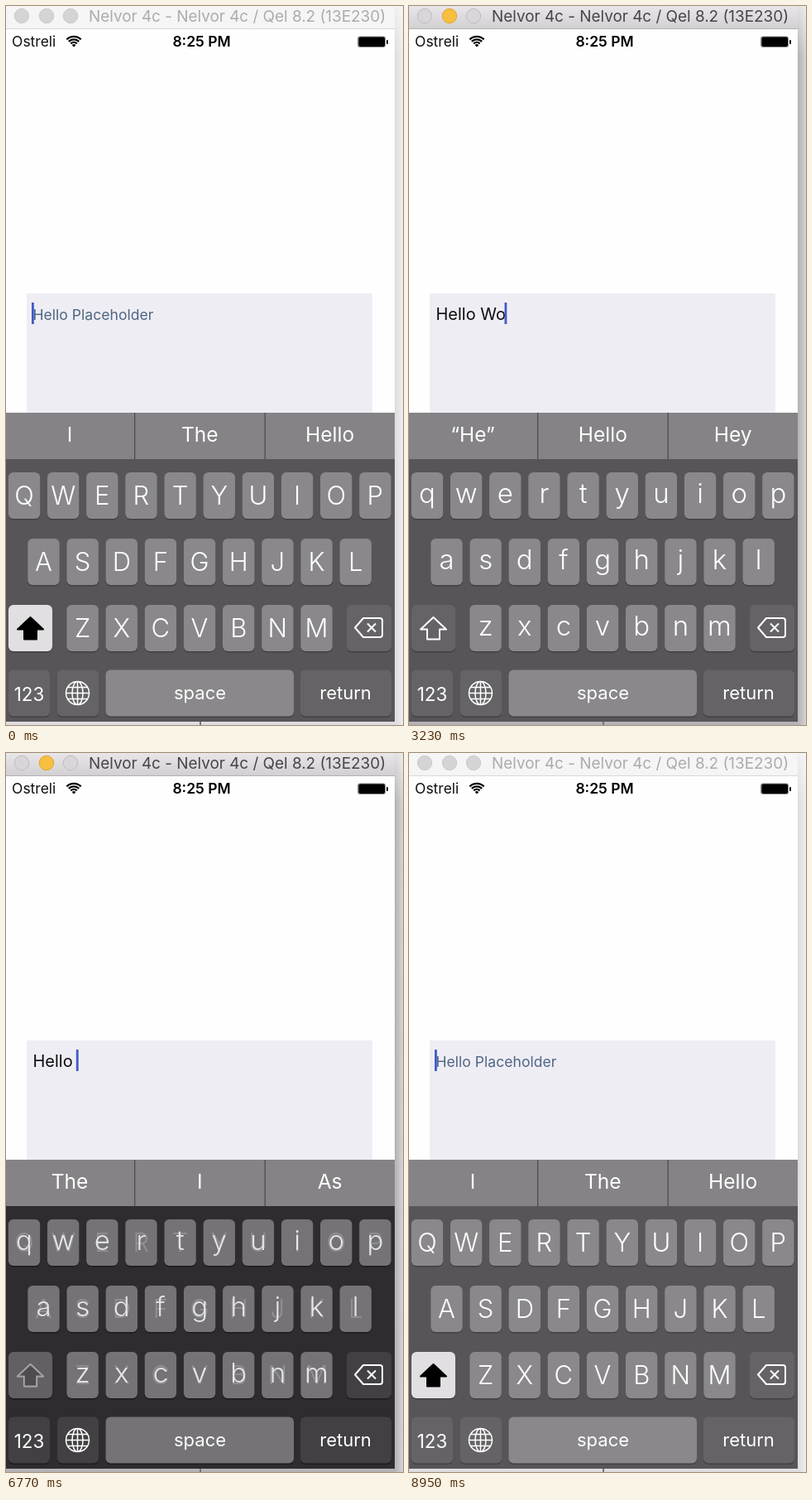
An HTML page with a canvas for the animation above (8990 ms loop, 480 px wide and 868 px high).

```html
<!DOCTYPE html>
<html lang="en">
<head>
<meta charset="utf-8">
<title>Text view placeholder</title>
<style>
  html, body { margin: 0; width: 100%; height: 100%; overflow: hidden; background: #fff; }
  canvas { display: block; }
</style>
</head>
<body>
<canvas id="stage" width="480" height="868"></canvas>
<script>
const ctx = document.getElementById('stage').getContext('2d');
const LOOP = 8990;
const FAMILY = 'Inter, Roboto, sans-serif';
const FULL = 'Hello World!!!';

// Timelines: [start in ms, value]
const typed = [
  [0, ''], [1340, 'J'], [1960, ''], [2400, 'H'], [2600, 'He'], [2720, 'Hel'],
  [2820, 'Hell'], [2920, 'Hello'], [3030, 'Hello '], [3130, 'Hello W'],
  [3210, 'Hello Wo'], [3330, 'Hello Wor'], [3450, 'Hello Worl'], [3560, 'Hello World'],
  [4250, 'Hello World!'], [4480, 'Hello World!!'], [4700, FULL]
];
for (let n = 1; n <= 8; n++) typed.push([5860 + 90 * n, FULL.slice(0, -n)]);
typed.push([6850, '']);

const hints = [
  [0, ['I', 'The', 'Hello']],
  [2870, ['“He”', 'Hello', 'Hey']],
  [3780, ['“World”', 'World', 'World’s']],
  [4340, ['The', 'I', 'As']],
  [4780, ['I', 'The', 'As']],
  [6150, ['The', 'I', 'As']],
  [8100, ['I', 'The', 'Hello']]
];
const shifts = [[-1000, 1], [1340, 0], [1960, 1], [2400, 0], [6710, 1]];
const blinks = [500, 5230, 7050, 8050];
const ACTIVE_FROM = 400, ACTIVE_TO = 8750, FADE = 300;

const at = (list, t) => list.filter(e => e[0] <= t).pop();
const clamp = v => Math.max(0, Math.min(1, v));
const mix = (a, b, p) => a.map((v, i) => v + (b[i] - v) * p);
const rgb = c => `rgb(${c.map(Math.round).join()})`;

function rect(x, y, w, h, fill) {
  ctx.fillStyle = fill;
  ctx.fillRect(x, y, w, h);
}

function round(x, y, w, h, r, fill) {
  ctx.fillStyle = fill;
  ctx.beginPath();
  ctx.roundRect(x, y, w, h, r);
  ctx.fill();
}

function text(str, x, y, size, fill, align = 'left', weight = 400) {
  ctx.font = `${weight} ${size}px ${FAMILY}`;
  ctx.textAlign = align;
  ctx.fillStyle = fill;
  ctx.fillText(str, x, y);
}

function path(points, close = true) {
  ctx.beginPath();
  points.forEach(([x, y]) => ctx.lineTo(x, y));
  if (close) ctx.closePath();
}

function gradient(x0, y0, x1, y1, a, b) {
  const g = ctx.createLinearGradient(x0, y0, x1, y1);
  g.addColorStop(0, a);
  g.addColorStop(1, b);
  return g;
}

function drawWindow(active) {
  rect(0, 0, 480, 868, '#fefefe');
  rect(470, 0, 10, 868, active
    ? gradient(470, 0, 480, 0, '#b3b1b3', '#d5d3d5')
    : gradient(470, 0, 480, 0, '#dddbdd', '#efedef'));
  rect(470, 0, 10, 60, gradient(0, 0, 0, 60, 'rgba(250,250,250,.65)', 'rgba(250,250,250,0)'));
  rect(0, 864, 470, 4, active ? '#b4b2b4' : '#dedcde');
  rect(234, 864, 2, 4, '#77757a');

  rect(0, 0, 470, 27, active ? gradient(0, 0, 0, 27, '#e8e6e8', '#d2d0d2') : '#f6f5f6');
  rect(0, 27, 470, 1, active ? '#b3b1b3' : '#d9d8d9');
  [19, 49, 78].forEach((x, i) => {
    const amber = active && i === 1;
    ctx.beginPath();
    ctx.arc(x, 12, 8.7, 0, 7);
    ctx.fillStyle = amber ? '#f7bf3f' : active ? '#d8d6d8' : '#d5d4d5';
    ctx.fill();
    ctx.lineWidth = 1;
    ctx.strokeStyle = amber ? '#dfa536' : active ? '#bebcbe' : '#cccbcc';
    ctx.stroke();
  });
  text('Nelvor 4c - Nelvor 4c / Qel 8.2 (13E230)', 100, 19, 18.9, active ? '#474547' : '#adabad');
}

function drawStatus() {
  text('Ostreli', 7, 49, 17.5, '#111');
  text('8:25 PM', 236.5, 49, 17.5, '#000', 'center', 600);
  ctx.strokeStyle = '#000';
  ctx.lineWidth = 2.3;
  [5.2, 8.7, 12.2].forEach(r => {
    ctx.beginPath();
    ctx.arc(82, 49, r, -Math.PI * 0.75, -Math.PI * 0.25);
    ctx.stroke();
  });
  ctx.fillStyle = '#000';
  ctx.beginPath();
  ctx.moveTo(82, 49.5);
  ctx.arc(82, 49.5, 3.2, -Math.PI * 0.75, -Math.PI * 0.25);
  ctx.fill();
  round(425, 36.5, 34, 13.5, 3, '#8a8a8a');
  round(426.5, 37.5, 31.5, 11.5, 2, '#000');
  round(460, 41, 2, 5, 1, '#000');
}

function caretAlpha(t) {
  const start = blinks.find(b => t >= b && t < b + 500);
  if (start === undefined) return 1;
  const u = t - start;
  return u < 220 ? 1 - u / 220 : clamp((u - 360) / 140);
}

function drawField(t) {
  rect(25, 347, 418, 144, '#efedf4');
  const str = at(typed, t)[1];
  let x = 32.5;
  if (str) {
    text(str, 32.5, 379, 20, '#0c0c0e');
    x += ctx.measureText(str).width;
  } else {
    text('Hello Placeholder', 32.5, 379, 17.6, '#4d6783');
  }
  ctx.globalAlpha = caretAlpha(t);
  rect(x - 1.5, 358, 2.8, 26, '#405bc8');
  ctx.globalAlpha = 1;
}

function drawArrow(fill, stroke) {
  path([[29.5, 738], [45, 752.5], [37, 752.5], [37, 764.5], [22, 764.5], [22, 752.5], [14, 752.5]]);
  ctx.lineJoin = 'round';
  ctx.lineWidth = 2;
  if (fill) {
    ctx.fillStyle = fill;
    ctx.fill();
  }
  ctx.strokeStyle = stroke;
  ctx.stroke();
}

function drawDelete() {
  ctx.strokeStyle = '#fff';
  ctx.lineWidth = 2;
  ctx.lineJoin = 'round';
  ctx.beginPath();
  ctx.moveTo(422, 750.5);
  ctx.lineTo(432, 739);
  ctx.lineTo(452, 739);
  ctx.quadraticCurveTo(455, 739, 455, 742);
  ctx.lineTo(455, 759);
  ctx.quadraticCurveTo(455, 762, 452, 762);
  ctx.lineTo(432, 762);
  ctx.closePath();
  ctx.moveTo(437, 745.5);
  ctx.lineTo(447, 755.5);
  ctx.moveTo(447, 745.5);
  ctx.lineTo(437, 755.5);
  ctx.stroke();
}

function drawGlobe() {
  const x = 86.5, y = 829.5, r = 14;
  ctx.strokeStyle = '#fff';
  ctx.lineWidth = 1.5;
  ctx.beginPath();
  ctx.arc(x, y, r, 0, 7);
  ctx.moveTo(x + 6.5, y);
  ctx.ellipse(x, y, 6.5, r, 0, 0, 7);
  ctx.moveTo(x, y - r);
  ctx.lineTo(x, y + r);
  [[0, 14], [-7, 12], [7, 12]].forEach(([dy, w]) => {
    ctx.moveTo(x - w, y + dy);
    ctx.lineTo(x + w, y + dy);
  });
  ctx.stroke();
}

function drawHints(t) {
  rect(0, 491, 470, 56, '#858386');
  rect(155, 491, 1.3, 56, '#4f4d50');
  rect(312.5, 491, 1.3, 56, '#4f4d50');
  at(hints, t)[1].forEach((w, i) => text(w, 77 + 157.3 * i, 526, 24.5, '#fff', 'center'));
}

function drawKeyboard(t) {
  const [start, upper] = at(shifts, t);
  const p = clamp((t - start) / FADE);
  const caps = upper ? p : 1 - p;
  const dark = clamp(Math.min(p / 0.15, (1 - p) / 0.3));
  const base = rgb(mix([87, 85, 88], [46, 44, 47], dark));
  const plain = rgb(mix([138, 136, 139], [117, 115, 118], dark));
  const special = mix([101, 99, 102], [66, 64, 67], dark);
  const edge = rgb(mix([66, 64, 67], [28, 27, 29], dark));
  const key = (x, y, w, fill) => {
    round(x, y + 1.5, w, 56, 6, edge);
    round(x, y, w, 56, 6, fill);
  };

  rect(0, 547, 470, 317, base);
  const rows = [['QWERTYUIOP', 22, 563], ['ASDFGHJKL', 45.5, 643], ['ZXCVBNM', 92.6, 723]];
  rows.forEach(([letters, x0, y]) => [...letters].forEach((c, i) => {
    const x = x0 + 47.15 * i;
    key(x - 19.2, y, 38.4, plain);
    if (caps > 0) {
      ctx.globalAlpha = caps;
      text(c, x, y + 39, 31, '#fff', 'center', 300);
    }
    if (caps < 1) {
      ctx.globalAlpha = 1 - caps;
      text(c.toLowerCase(), x, y + 37, 33, '#fff', 'center', 300);
    }
    ctx.globalAlpha = 1;
  }));

  key(3, 723, 53, rgb(mix(special, [225, 223, 226], caps)));
  ctx.globalAlpha = 1 - caps;
  drawArrow(null, '#fff');
  ctx.globalAlpha = caps;
  drawArrow('#000', '#000');
  ctx.globalAlpha = 1;

  const tone = rgb(special);
  key(412, 723, 54, tone);
  drawDelete();
  key(3, 801.5, 50, tone);
  text('123', 28, 838.5, 22.4, '#fff', 'center');
  key(62, 801.5, 50, tone);
  drawGlobe();
  key(120.5, 801.5, 227.5, plain);
  text('space', 234.5, 836.5, 22, '#fff', 'center');
  key(356, 801.5, 110, tone);
  text('return', 410.5, 836.5, 22, '#fff', 'center');
}

function frame() {
  const t = performance.now() % LOOP;
  drawWindow(t >= ACTIVE_FROM && t < ACTIVE_TO);
  drawStatus();
  drawField(t);
  drawHints(t);
  drawKeyboard(t);
  requestAnimationFrame(frame);
}
frame();
</script>
</body>
</html>
```
